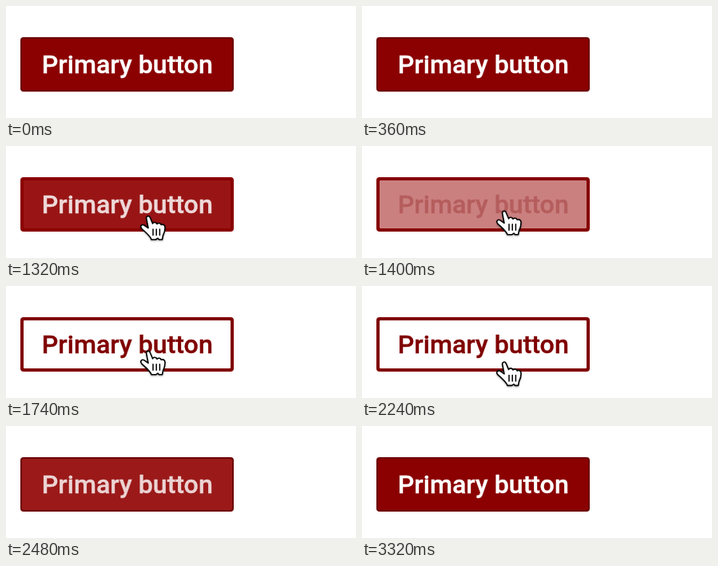
An HTML page that plays this animation: 438 px wide and 140 px high, repeating every 3420 ms.

```html
<!DOCTYPE html>
<html lang="en">
<head>
<meta charset="utf-8">
<title>Primary button hover</title>
<style>
  html, body { margin: 0; width: 100%; height: 100%; overflow: hidden; background: #fff; }
  svg { display: block; width: 438px; height: 140px; }
  text {
    font: 500 32.2px Roboto, Arial, sans-serif; text-anchor: middle;
    fill: currentColor; stroke: currentColor; stroke-width: .35px;
  }
  #cursor { filter: drop-shadow(0 1px 1px rgba(0, 0, 0, .35)); }
</style>
</head>
<body>
<svg viewBox="0 0 438 140">
  <rect id="edge" x="18" y="39" width="267" height="68" rx="4"/>
  <rect id="face"/>
  <text id="label" x="151.8" y="84">Primary button</text>
  <g id="cursor" stroke="#000" stroke-linecap="round" stroke-linejoin="round">
    <path fill="#fff" stroke-width="1.6" d="M-2.2 4C-3 .5 1-.5 2.2 2.2L5.5 10C6.5 7.8 10 8 11 10.5C12.5 8.8 15.5 9.3 16.2 11.5C18.5 10.5 20.8 11.5 21 14.5C21.3 19 20.5 21 18.5 25L17.5 30H13.5L12 28.3L9.5 30H4C3 26-2 22-8 16.5C-11 13-8 10.5-5 12L0 15.5Z"/>
    <path fill="none" stroke-width="1.5" d="M6 17V24.5M10.2 17V24.5M14.4 17V24.5"/>
  </g>
</svg>
<script>
const LOOP = 3420;
const RED = [139, 0, 0], MAROON = [128, 0, 0], DARK = [108, 0, 0], WHITE = [255, 255, 255];
const ENTER = 1265, LEAVE = 2291, FADE = 250;
const GAMMA = 0.83;
const [edge, face, label, cursor] =
  ['edge', 'face', 'label', 'cursor'].map(id => document.getElementById(id));

const ease = (time, start, duration) => {
  const u = Math.min(1, Math.max(0, (time - start) / duration));
  return u * u * (3 - 2 * u);
};
const rgb = color => `rgb(${color.map(Math.round).join()})`;
const mix = (from, to, p) =>
  rgb(from.map((c, i) => (c ** GAMMA * (1 - p) + to[i] ** GAMMA * p) ** (1 / GAMMA)));
const setAll = (node, attributes) => {
  for (const name in attributes) node.setAttribute(name, attributes[name]);
};

function draw(time) {
  const hovered = time >= ENTER && time < LEAVE;
  const light = ease(time, ENTER, FADE) - ease(time, LEAVE, FADE);
  const present = ease(time, 1080, 300) - ease(time, 2180, 200);
  const border = hovered ? 4 : 2;

  edge.setAttribute('fill', hovered ? mix(RED, MAROON, light) : rgb(DARK));
  setAll(face, {
    x: 18 + border, y: 39 + border,
    width: 267 - 2 * border, height: 68 - 2 * border,
    rx: hovered ? 1 : 2.5,
    fill: mix(RED, WHITE, light)
  });
  label.style.color = mix(WHITE, MAROON, light);
  setAll(cursor, {
    transform: `translate(178 ${142 - 61.2 * present})`,
    visibility: present > 0 ? 'visible' : 'hidden'
  });
}

const start = performance.now();
function tick() {
  draw((performance.now() - start) % LOOP);
  requestAnimationFrame(tick);
}
tick();
</script>
</body>
</html>
```
